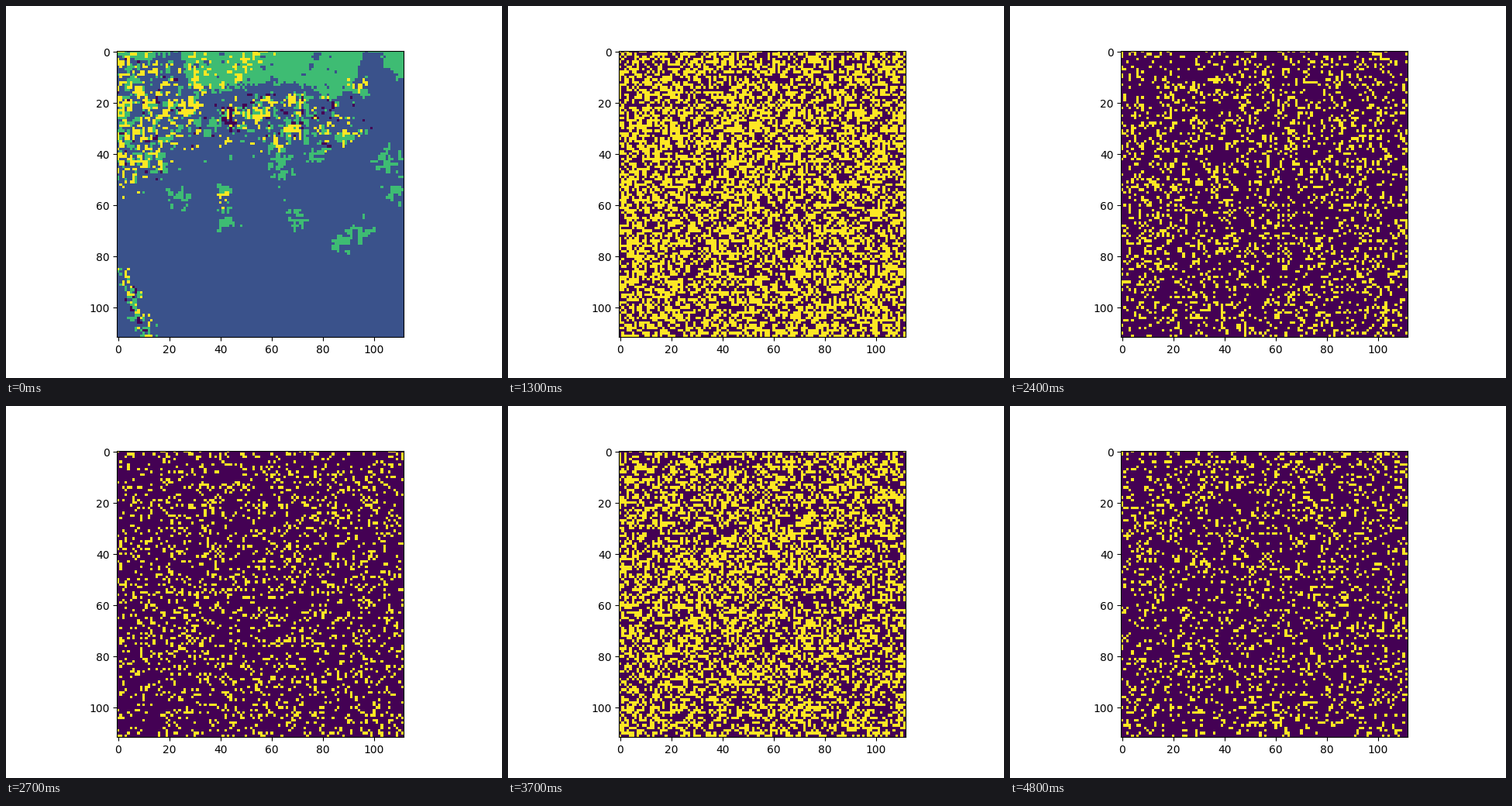
Write a matplotlib script that moves like this. It is 640x480 px and loops after 4900 ms.

```python
import numpy as np
import matplotlib.pyplot as plt
from matplotlib.animation import FuncAnimation

N = 112
FRAMES = 49
EDGES_START, STATIC_START = 4, 13
Y, X = np.mgrid[:N, :N].astype(float)

# Key points: lower rim of the green sky, ridge line, share of lit cells
SKY_RIM = [(24, 0), (28, 14), (40, 15), (57, 12), (74, 13), (84, 20),
           (92, 12), (96, 0), (101, 0), (104, 5), (112, 12)]
RIDGE = [(20, 26), (40, 29), (50, 34), (55, 34), (60, 28), (68, 30), (76, 27)]
DENSITY = [(13, .5), (19, .58), (24, .2), (31, .12), (37, .43), (48, .17)]

# Centres and radii
ISLANDS = [(25, 57, 5), (41, 54, 3), (42, 65, 5), (70, 65, 4), (94, 70, 5),
           (87, 75, 4), (106, 43, 6), (108, 56, 4), (78, 39, 5)]
CLUSTERS = [(44, 25, 5), (57, 22, 5), (70, 20, 4), (68, 31, 4),
            (94, 14, 4), (89, 34, 4), (27, 22, 4)]


def along(points, at):
    return np.interp(at, *zip(*points))


def bell(cx, cy, w, h):
    """Flat-topped bump, one at the centre."""
    return np.exp(-(((X - cx) / w) ** 2 + ((Y - cy) / h) ** 2) ** 2)


def bumps(spots):
    return np.max([bell(x, y, r, r) for x, y, r in spots], axis=0)


def line(offset, width):
    return np.exp(-(offset / width) ** 2)


def grain(rng, clump):
    """Uniform noise whose neighbouring cells tend to agree."""
    g = rng.normal(size=(N, N))
    near = sum(np.roll(g, s, axis) for s in (-1, 1) for axis in (0, 1))
    order = (g + clump * near).ravel().argsort().argsort()
    return order.reshape(N, N) / N ** 2


west = bell(0, 25, 27, 25)
band = bell(62, 27, 30, 11)
tail = line(X - (Y - 84) / 2.2, 3) * (Y > 84) * (X < 18)
streaks = (line(Y - 14 + (X - 34) * .6, 5) * bell(44, 6, 16, 10)
           + bell(31, 8, 4, 10))


def terrain(rng):
    sky = Y + rng.normal(0, 1.2, (N, N)) < along(SKY_RIM, X)
    sky &= grain(rng, .6) < .97
    green = np.maximum.reduce([
        .32 * west, .3 * band, .5 * bell(63, 39, 5, 14), .65 * bell(9, 1, 11, 3),
        .45 * bumps(ISLANDS), .5 * bumps(CLUSTERS), .4 * tail])
    yellow = np.maximum.reduce([
        .32 * west, .12 * band, .45 * bumps(CLUSTERS), .35 * streaks,
        .3 * tail, .5 * bell(41, 57, 2, 4)])
    dark = .05 * west + .05 * band + .3 * bell(44, 25, 4, 6) + .06 * tail

    z = np.full((N, N), .25)
    z[sky | (green > grain(rng, .5))] = .69
    z[yellow > grain(rng, .2)] = 1
    z[dark > grain(rng, .2)] = 0
    return z


def edges(rng):
    ridge = line(Y - along(RIDGE, X), 2.2) * ((X > 19) & (X < 77))
    plume = bell(61, 8, 2, 9) + bell(64, 0, 5, 3)
    teal = np.maximum.reduce([
        .32 * bell(9, 18, 12, 9), .45 * ridge, .6 * plume,
        .07 * bell(8, 40, 16, 17), .04 * bell(45, 10, 16, 14)])
    gold = np.maximum(.14 * ridge, .1 * bell(7, 26, 9, 8))

    z = np.zeros((N, N))
    z[teal > grain(rng, .4)] = .57
    z[gold > grain(rng, .3)] = 1
    return z


def static(rng, frame):
    return (rng.random((N, N)) < along(DENSITY, frame)).astype(float)


def picture(frame):
    rng = np.random.default_rng(frame + 5)
    if frame < EDGES_START:
        return terrain(rng)
    if frame < STATIC_START:
        return edges(rng)
    return static(rng, frame)


fig, ax = plt.subplots(figsize=(6.4, 4.8), dpi=100)
image = ax.imshow(picture(0), cmap="viridis", vmin=0, vmax=1)


def update(frame):
    image.set_data(picture(frame))
    return (image,)


anim = FuncAnimation(fig, update, frames=FRAMES, interval=100,
                     repeat=True, repeat_delay=0, blit=False)
plt.show()
```
